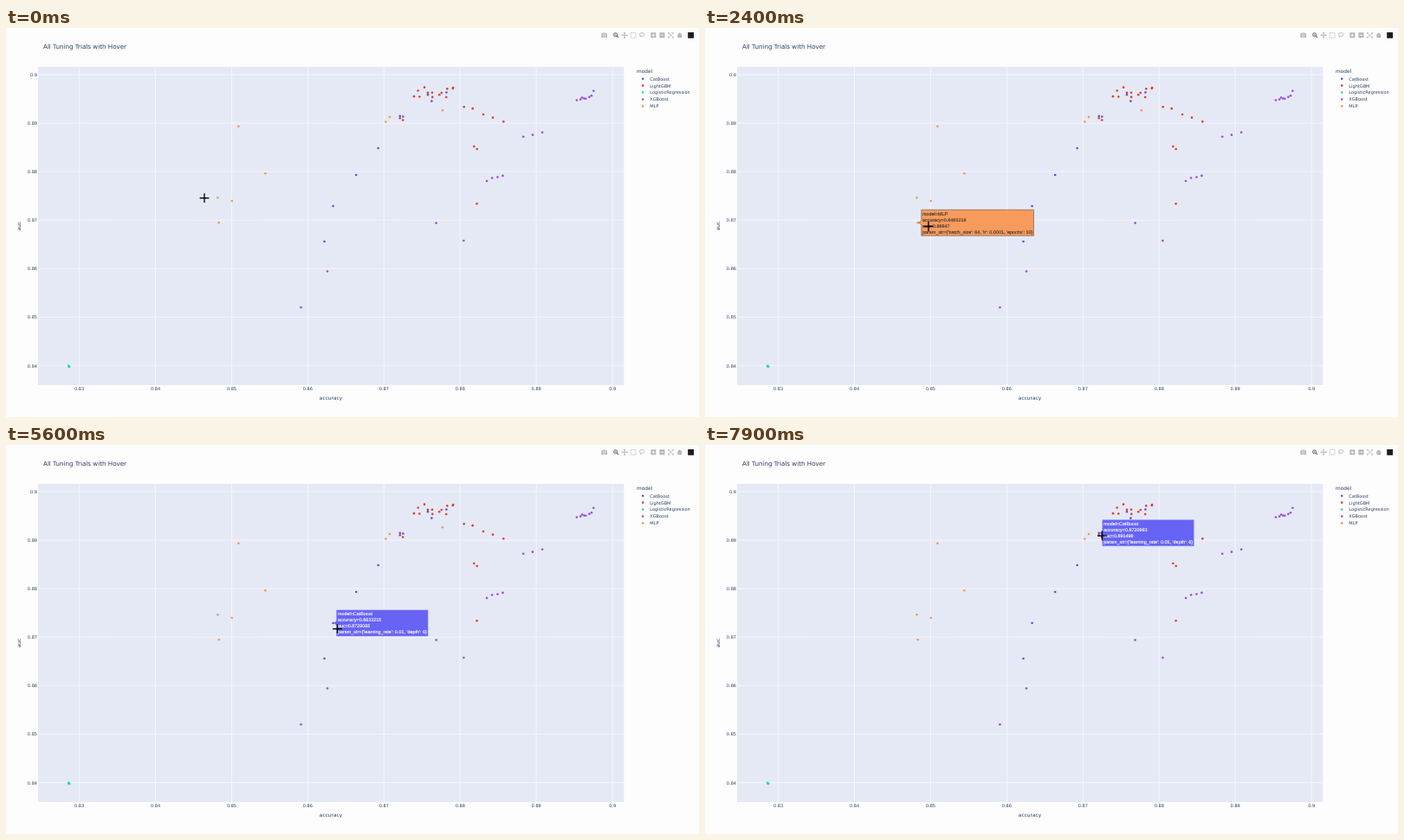
Recreate the animation shown at these times as an HTML page with a canvas. Size 800 by 450 pixels, loop 8000 ms.

```html
<!DOCTYPE html>
<html lang="en">
<head>
<meta charset="utf-8">
<title>All Tuning Trials with Hover</title>
<style>
html, body { margin: 0; width: 100%; height: 100%; overflow: hidden; background: #fdfdfd; }
canvas { display: block; width: 800px; height: 450px; }
</style>
</head>
<body>
<canvas id="stage" width="800" height="450"></canvas>
<script>
const ctx = document.getElementById('stage').getContext('2d');
const LOOP = 8000, STEP = 100, REACH = 20;
const INK = '#2a3f5f', PAPER = '#fdfdfd', GRAY = '#b4b4b9';
const SANS = '"DejaVu Sans", sans-serif', LABEL = '"Liberation Sans", Arial, sans-serif';

const toX = accuracy => 84.6 + (accuracy - 0.83) * 8793;
const toY = auc => 54 + (0.9 - auc) * 5610;

let seed = 7;
const jitter = amount => {
  seed = seed * 16807 % 2147483647;
  return (seed / 2147483647 * 2 - 1) * amount;
};

// Evenly stepped points, optionally shaken
const run = (count, x, y, dx = 0, dy = 0, shake = 0) =>
  Array.from({ length: count }, (_, i) => [x + dx * i + jitter(shake / 3), y + dy * i + jitter(shake)]);

const trial = (model, accuracy, auc, params) => ({
  model, x: toX(accuracy), y: toY(auc),
  lines: [`model=${model}`, `accuracy=${accuracy}`, `auc=${auc}`, `param_str={${params}}`]
});
const mlp = (accuracy, auc, epochs) =>
  trial('MLP', accuracy, auc, `'batch_size': 64, 'lr': 0.0001, 'epochs': ${epochs}`);
const cat = (accuracy, auc, rate, depth) =>
  trial('CatBoost', accuracy, auc, `'learning_rate': ${rate}, 'depth': ${depth}`);

const trials = [
  mlp(0.8481873, 0.8746427, 15),
  mlp(0.8483218, 0.86947, 10),
  cat(0.8633215, 0.8729065, 0.01, 6),
  cat(0.8663483, 0.8793141, 0.01, 8),
  cat(0.8692416, 0.8848512, 0.01, 10),
  cat(0.8720993, 0.891498, 0.05, 6)
];

const models = [
  { name: 'CatBoost', color: '#5a4fdc', runs: [
    run(1, 367.6, 247), run(2, 458.3, 102.5, 33.1, -17.9), run(2, 487, 77.3, 21.4, -2.8)] },
  { name: 'LightGBM', color: '#e03c30', runs: [
    run(13, 470, 77, 4, -0.4, 8), run(2, 454.8, 104.2, 3.4, 2.3), run(5, 528.3, 89, 11.3, 5.5, 3),
    run(2, 540.3, 137, 3.4, 3), run(1, 543.6, 203.3)] },
  { name: 'LogisticRegression', color: '#25dba6', runs: [run(4, 72.3, 391.2, 0.3, 0.4, 1)] },
  { name: 'XGBoost', color: '#9a4be0', runs: [
    run(2, 340.5, 323.3, 30.5, -41.8), run(2, 496.6, 225.6, 31.8, 20.4), run(4, 553.6, 178, 6.8, -2, 5),
    run(3, 597, 125, 11.2, -2, 1), run(8, 659.6, 86, 2.6, -1.7, 3)] },
  { name: 'MLP', color: '#f09a50', runs: [
    run(2, 438.4, 108.6, 4.6, -5.6), run(2, 268.4, 113.7, 30.9, 54.6), run(1, 260.8, 200), run(1, 503.9, 95.3)] }
];
for (const { name, runs } of models) {
  runs.push(trials.filter(t => t.model === name).map(t => [t.x, t.y]));
}

const themes = {
  MLP: { fill: '#f79b5c', ink: '#40362f', border: '#6a5340' },
  CatBoost: { fill: '#6763f5', ink: '#fff', border: '#8684f7' }
};

// Pointer moves: start, end, destination
const home = [229, 196.7];
const moves = [
  [100, 800, 255, 206.5], [1900, 2400, 258, 229.5], [3700, 4200, 380, 216.5], [4800, 5400, 382.5, 212.7],
  [5600, 6200, 406.7, 177.3], [6900, 7400, 434, 146], [7600, 7900, 458.5, 105]
];

function pointerAt(t) {
  let [x, y] = home;
  for (const [start, end, toX, toY] of moves) {
    const k = Math.min(1, Math.max(0, (t - start) / (end - start)));
    const ease = k * k * (3 - 2 * k);
    x += (toX - x) * ease;
    y += (toY - y) * ease;
  }
  return [x, y];
}

function text(str, x, y, size, align = 'left') {
  ctx.font = `${size}px ${SANS}`;
  ctx.fillStyle = INK;
  ctx.textAlign = align;
  ctx.fillText(str, x, y);
}

function trace(points) {
  ctx.beginPath();
  for (const [x, y] of points) ctx.lineTo(x, y);
}

function line(color, width, ...points) {
  trace(points);
  ctx.strokeStyle = color;
  ctx.lineWidth = width;
  ctx.stroke();
}

function rect(color, x, y, w, h) {
  ctx.fillStyle = color;
  ctx.fillRect(x, y, w, h);
}

function dot(color, x, y, r = 1.3) {
  ctx.fillStyle = color;
  ctx.beginPath();
  ctx.arc(x, y, r, 0, 7);
  ctx.fill();
}

function ring(color, x, y, rx, ry, width) {
  ctx.strokeStyle = color;
  ctx.lineWidth = width;
  ctx.beginPath();
  ctx.ellipse(x, y, rx, ry, 0, 0, 7);
  ctx.stroke();
}

function cross(color, width, x, y, r) {
  line(color, width, [x - r, y], [x + r, y]);
  line(color, width, [x, y - r], [x, y + r]);
}

function drawToolbar() {
  const y = 8.3, active = '#707078';
  // Camera
  rect(GRAY, 687.3, y - 2, 6.6, 4.8);
  rect(GRAY, 689.2, y - 2.8, 2.8, 1);
  ring(PAPER, 690.6, y + 0.4, 1.4, 1.4, 0.7);
  // Zoom
  ring(active, 703.6, y - 0.5, 2.1, 2.1, 1);
  cross(active, 0.6, 703.6, y - 0.5, 1.1);
  line(active, 1.2, [705, y + 0.9], [707, y + 2.9]);
  // Pan
  cross(GRAY, 0.9, 714.1, y, 3.3);
  for (const d of [-2.7, 2.7]) {
    dot(GRAY, 714.1 + d, y, 0.9);
    dot(GRAY, 714.1, y + d, 0.9);
  }
  // Box and lasso selection
  ctx.setLineDash([1.3, 0.8]);
  ctx.strokeStyle = GRAY;
  ctx.lineWidth = 0.8;
  ctx.strokeRect(721.3, y - 2.8, 5.8, 5.8);
  ctx.setLineDash([]);
  ring(GRAY, 734.2, y - 0.8, 3, 2, 0.8);
  line(GRAY, 0.8, [732, y + 0.7], [732.4, y + 2.7]);
  // Zoom in and out
  for (const x of [747.3, 757.4]) rect(GRAY, x - 3, y - 3, 6, 6);
  cross(PAPER, 0.9, 747.3, y, 1.8);
  line(PAPER, 0.9, [755.6, y], [759.2, y]);
  // Autoscale
  for (const s of [-3, 3]) {
    line(GRAY, 0.8, [767.5 - s, y - 3], [767.5 + s, y + 3]);
    for (const v of [-3, 3]) {
      const x = 767.5 + s;
      line(GRAY, 0.7, [x - s / 2, y + v], [x, y + v], [x, y + v / 2]);
    }
  }
  // Reset
  trace([[774.3, y + 0.3], [777.7, y - 3], [781, y + 0.3]]);
  ctx.fillStyle = GRAY;
  ctx.fill();
  rect(GRAY, 775.4, y, 4.6, 3);
  rect('#1b1c22', 787.2, y - 3.3, 6.8, 6.8);
}

function drawChart() {
  rect(PAPER, 0, 0, 800, 450);
  rect('#e5e9f5', 37, 45, 676.3, 368);
  for (let tick = 83; tick <= 90; tick++) {
    const x = toX(tick / 100);
    line('#f8faff', 0.75, [x, 45], [x, 413]);
    text(tick / 100, x, 418.8, 5, 'center');
  }
  for (let tick = 84; tick <= 90; tick++) {
    const y = toY(tick / 100);
    line('#f8faff', 0.75, [37, y], [713.3, y]);
    text(tick / 100, 36, y + 1.9, 5, 'right');
  }
  text('All Tuning Trials with Hover', 43, 24.2, 7.15);
  text('accuracy', 375, 430, 5.83, 'center');
  ctx.save();
  ctx.translate(17, 229);
  ctx.rotate(-Math.PI / 2);
  text('auc', 0, 0, 5.83, 'center');
  ctx.restore();
  text('model', 728, 52.3, 5.83);
  models.forEach(({ name, color, runs }, i) => {
    const y = 58.7 + i * 7.92;
    dot(color, 735.2, y);
    text(name, 743.3, y + 1.9, 5);
    for (const [px, py] of runs.flat()) dot(color, px, py);
  });
  drawToolbar();
}

function drawHover({ model, x, y, lines }) {
  const { fill, ink, border } = themes[model];
  const left = x + 4.1, top = y - 15, bottom = y + 15;
  ctx.font = `5.41px ${LABEL}`;
  ctx.textAlign = 'left';
  const right = left + ctx.measureText(lines[3]).width + 2.5;
  trace([[x + 1, y], [left, y - 2.5], [left, top], [right, top], [right, bottom], [left, bottom], [left, y + 2.5]]);
  ctx.closePath();
  ctx.fillStyle = fill;
  ctx.fill();
  ctx.strokeStyle = border;
  ctx.lineWidth = 0.6;
  ctx.stroke();
  ctx.fillStyle = ctx.strokeStyle = ink;
  ctx.lineWidth = 0.15;
  lines.forEach((str, i) => {
    const at = [left + 1.25, y - 8.7 + i * 7.05];
    ctx.fillText(str, ...at);
    ctx.strokeText(str, ...at);
  });
}

function frame() {
  const t = Math.floor(performance.now() % LOOP / STEP) * STEP;
  const [x, y] = pointerAt(t);
  // The pointer's hot spot lies up and left of the drawn cross
  const distance = p => Math.hypot(p.x - x + 5, p.y - y + 6);
  const nearest = trials.reduce((a, b) => distance(b) < distance(a) ? b : a);
  drawChart();
  if (distance(nearest) < REACH) drawHover(nearest);
  cross('#000', 1.35, x, y, 5.4);
  requestAnimationFrame(frame);
}

ctx.textRendering = 'geometricPrecision';
frame();
</script>
</body>
</html>
```
